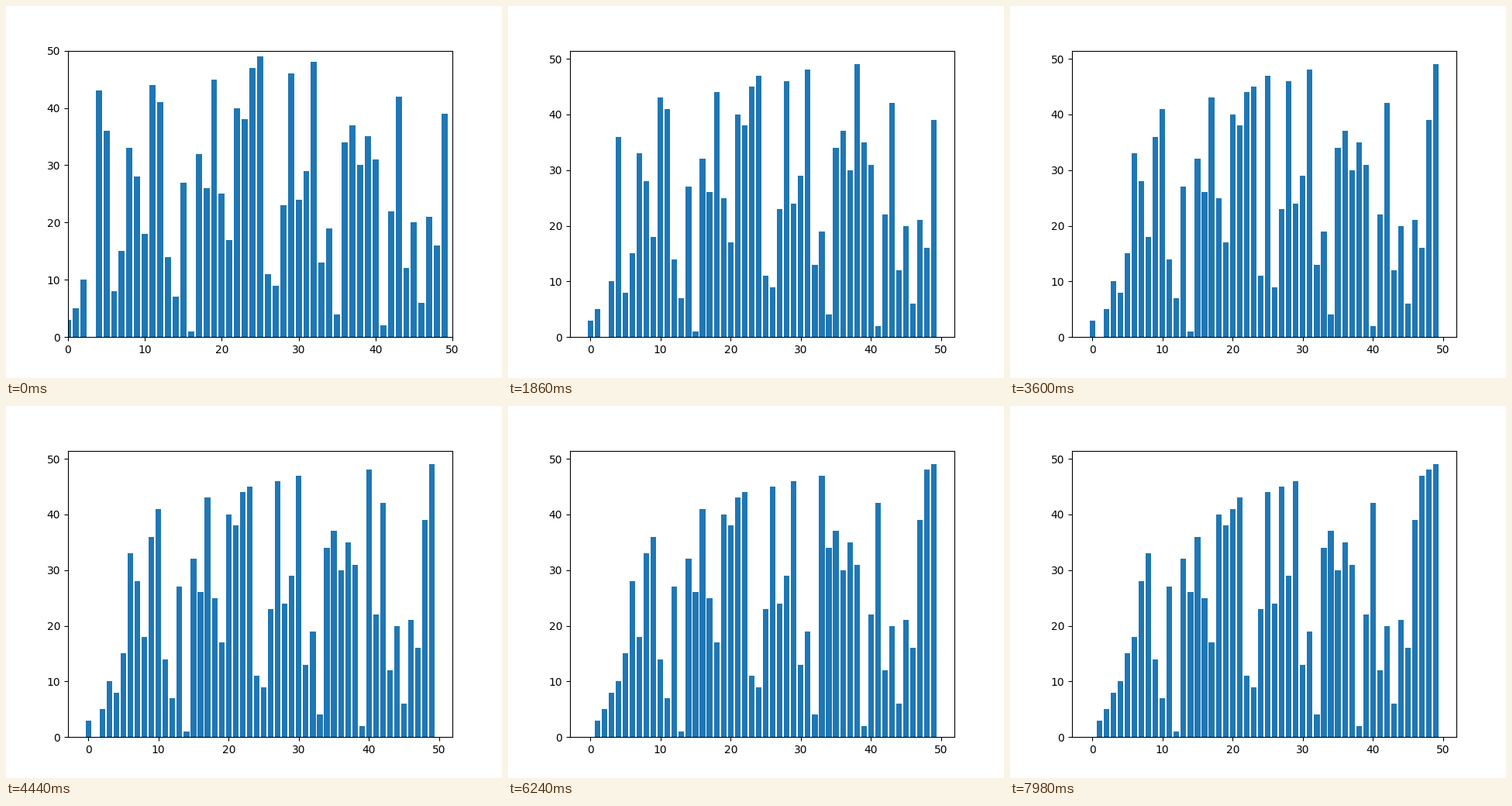
Recreate the animation shown at these times as a matplotlib script. Size 640 by 480 pixels, loop 8 s.

```python
import matplotlib.pyplot as plt
from matplotlib.animation import FuncAnimation

LOOP_MS = 8000
TICK_MS = 20
TICKS_PER_SWAP = 3
FRAMES = LOOP_MS // TICK_MS

START = [3, 5, 10, 0, 43, 36, 8, 15, 33, 28,
         18, 44, 41, 14, 7, 27, 1, 32, 26, 45,
         25, 17, 40, 38, 47, 49, 11, 9, 23, 46,
         24, 29, 48, 13, 19, 4, 34, 37, 30, 35,
         31, 2, 22, 42, 12, 20, 6, 21, 16, 39]


def bubble_states(values, count):
    """Return the list before sorting and after each swap, up to count states."""
    a = list(values)
    states = [a[:]]
    for end in range(len(a) - 1, 0, -1):
        for j in range(end):
            if a[j] > a[j + 1]:
                a[j], a[j + 1] = a[j + 1], a[j]
                states.append(a[:])
                if len(states) == count:
                    return states
    return states


states = bubble_states(START, (FRAMES - 1) // TICKS_PER_SWAP + 1)
n, top = len(START), max(START)
margin = 0.05 * (n - 0.2)

fig, ax = plt.subplots(figsize=(6.4, 4.8), dpi=100)
bars = ax.bar(range(n), START, color="#1f77b4")


def set_limits(step):
    # The tight opening view gives way to padded limits at the first swap.
    if step == 0:
        ax.set(xlim=(0, n), ylim=(0, n))
    else:
        ax.set(xlim=(-0.4 - margin, n - 0.6 + margin), ylim=(0, top * 1.05))


def draw(frame):
    step = frame // TICKS_PER_SWAP
    set_limits(step)
    for bar, value in zip(bars, states[step]):
        bar.set_height(value)
    return bars.patches


def init():
    return draw(0)


anim = FuncAnimation(fig, draw, frames=FRAMES, init_func=init,
                     interval=TICK_MS, repeat=True, repeat_delay=0)
plt.show()
```
